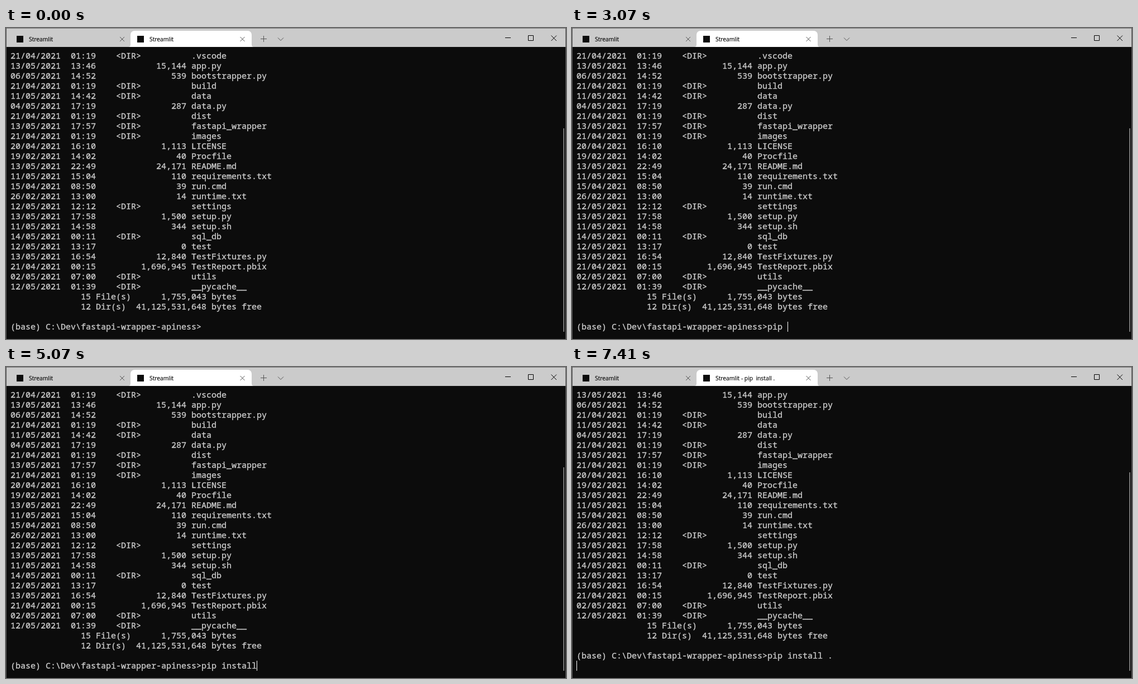
Write an HTML page that moves like this. It is 1003 px wide and 558 px high and loops after 8 s.

```html
<!DOCTYPE html>
<html lang="en">
<head>
<meta charset="utf-8">
<title>Terminal</title>
<style>
  html, body { margin: 0; width: 100%; height: 100%; overflow: hidden; background: #0c0c0c; }
  svg { display: block; width: 1003px; height: 558px; }
  text { white-space: pre; font-kerning: none; font-variant-ligatures: none; }
  #screen { font: 15px "Noto Sans Mono", monospace; fill: #ccc; stroke: #ccc; stroke-width: .35; }
  .title { font: 10.3px "Open Sans", "Noto Sans", sans-serif; fill: #000; stroke: #000; stroke-width: .15; }
  .line { fill: none; stroke: #000; stroke-width: 1; }
  .soft { stroke: #555; }
</style>
</head>
<body>
<svg viewBox="0 0 1003 558">
  <rect width="1003" height="558" fill="#0c0c0c"/>
  <rect width="1003" height="34" fill="#cbcbcb"/>
  <path d="M219 34a4 4 0 0 0 4-4V12a7 7 0 0 1 7-7H433a7 7 0 0 1 7 7V30a4 4 0 0 0 4 4z" fill="#fff"/>

  <rect x="19" y="14" width="12" height="12" fill="#0c0c0c"/>
  <rect x="235" y="14" width="12" height="12" fill="#0c0c0c"/>
  <text class="title" x="41" y="24">Streamlit</text>
  <text class="title" id="tab" x="257" y="24">Streamlit</text>

  <path class="line soft" d="M204 16l8 8m0-8l-8 8M419.500 16l8 8m0-8l-8 8"/>
  <path class="line soft" d="M456 19.500h11m-5.500-5.500v11M487 17.500l5 5 5-5"/>
  <path class="line" d="M894 17.500h10M935.500 13.500h9v9h-9zM976.500 13.500l9.500 9.500m0-9.500l-9.500 9.500"/>

  <g id="screen"></g>
  <rect id="cursor" y="527" width="1" height="18" fill="#fff"/>
  <rect id="bar" x="998" width="2" fill="#767676"/>
  <path d="M0 .5H1003" stroke="#777"/>
  <path d="M.5 0V558M1002.500 0V558" stroke="#555"/>
</svg>
<script>
const LOOP = 8000, CELL = 9, ROW = 18, LEFT = 8, ROWS = 28;
const PROMPT = String.raw`(base) C:\Dev\fastapi-wrapper-apiness>`;
const COMMAND = 'pip install .';

const listing = `
21/04/2021  01:19    <DIR>          .vscode
13/05/2021  13:46            15,144 app.py
06/05/2021  14:52               539 bootstrapper.py
21/04/2021  01:19    <DIR>          build
11/05/2021  14:42    <DIR>          data
04/05/2021  17:19               287 data.py
21/04/2021  01:19    <DIR>          dist
13/05/2021  17:57    <DIR>          fastapi_wrapper
21/04/2021  01:19    <DIR>          images
20/04/2021  16:10             1,113 LICENSE
19/02/2021  14:02                40 Procfile
13/05/2021  22:49            24,171 README.md
11/05/2021  15:04               110 requirements.txt
15/04/2021  08:50                39 run.cmd
26/02/2021  13:00                14 runtime.txt
12/05/2021  12:12    <DIR>          settings
13/05/2021  17:58             1,500 setup.py
11/05/2021  14:58               344 setup.sh
14/05/2021  00:11    <DIR>          sql_db
12/05/2021  13:17                 0 test
13/05/2021  16:54            12,840 TestFixtures.py
21/04/2021  00:15         1,696,945 TestReport.pbix
02/05/2021  07:00    <DIR>          utils
12/05/2021  01:39    <DIR>          __pycache__
              15 File(s)      1,755,043 bytes
              12 Dir(s)  41,125,531,648 bytes free
`.slice(1).split('\n');

// [start in ms, characters typed, cursor visible, command entered]
const steps = [
  [0, 0, 0], [630, 0, 1], [1070, 0, 0], [1710, 0, 1],
  [2080, 1, 1], [2330, 2, 1], [2760, 3, 1], [3070, 4, 1],
  [3590, 5, 1], [3840, 6, 1], [4150, 7, 1], [4300, 8, 1],
  [4700, 9, 1], [4950, 10, 1], [5070, 11, 1], [5450, 12, 1],
  [6000, 12, 0], [6500, 13, 1], [7160, 13, 0], [7410, 13, 1, 1]
];

const el = id => document.getElementById(id);
const rows = Array.from({ length: ROWS }, (_, i) => {
  const row = document.createElementNS('http://www.w3.org/2000/svg', 'text');
  row.setAttribute('x', LEFT);
  row.setAttribute('y', 55 + i * ROW);
  return el('screen').appendChild(row);
});

function render([, typed, visible, entered = 0]) {
  const lines = [...listing, PROMPT + COMMAND.slice(0, typed), ''];
  rows.forEach((row, i) => { row.textContent = lines[i + entered]; });

  const column = entered ? 0 : PROMPT.length + typed;
  el('cursor').setAttribute('x', LEFT + column * CELL);
  el('cursor').setAttribute('visibility', visible ? 'visible' : 'hidden');

  const top = entered ? 189 : 180;
  el('bar').setAttribute('y', top);
  el('bar').setAttribute('height', 545 - top);
  el('tab').textContent = entered ? 'Streamlit - pip  install .' : 'Streamlit';
}

let shown;
function tick() {
  const t = performance.now() % LOOP;
  const step = steps.findLast(s => s[0] <= t);
  if (step !== shown) render(shown = step);
  requestAnimationFrame(tick);
}
tick();
</script>
</body>
</html>
```
